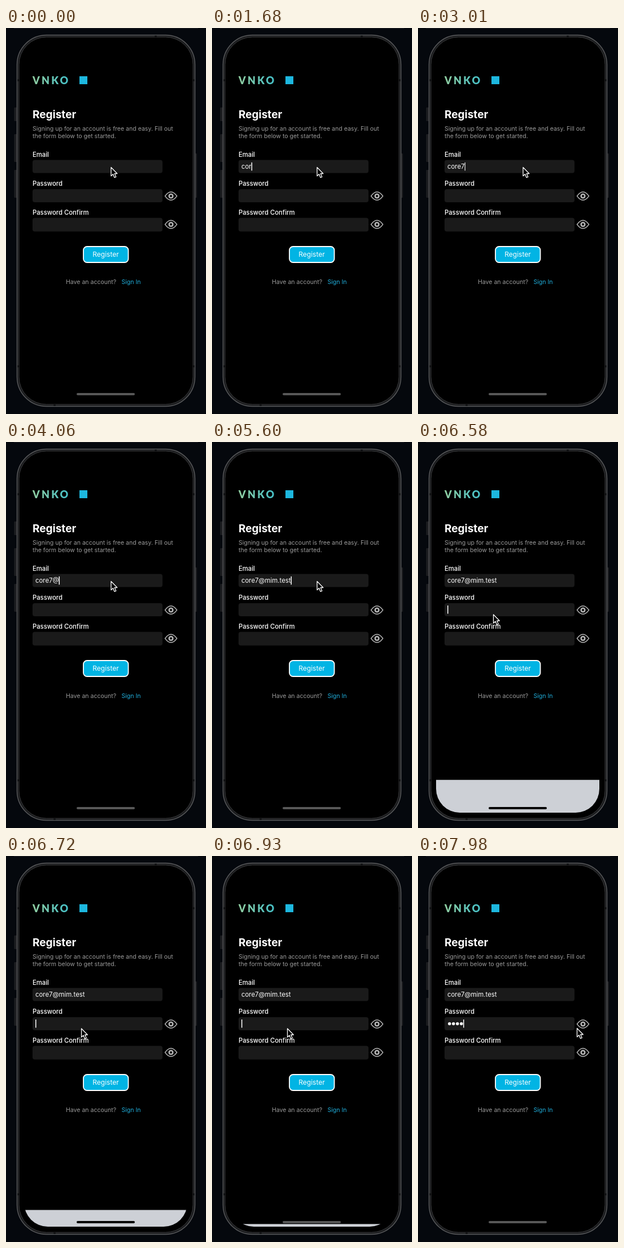
An HTML page for the animation above (8 s loop, 354 by 680 pixels).

```html
<!DOCTYPE html>
<html lang="en">
<head>
<meta charset="utf-8">
<title>Register form</title>
<style>
  html, body { margin: 0; width: 100%; height: 100%; overflow: hidden; background: #05080d; }
  svg { display: block; width: 354px; height: 680px; }
  text { font: 10.55px Inter, sans-serif; fill: #999; }
  .logo { font: 900 18px Lato, sans-serif; letter-spacing: 3.2px; fill: url(#tint); }
  .title { font-size: 19px; font-weight: 700; fill: #fff; }
  .label { font-size: 11.3px; font-weight: 500; fill: #fff; }
  .typed { font-size: 11.4px; fill: #fff; }
  .button { font-size: 12px; fill: #fff; }
  .link { fill: #20aedb; }
  .field { fill: #1a1a1a; }
</style>
</head>
<body>
<svg viewBox="0 0 354 680">
  <defs>
    <linearGradient id="tint" gradientUnits="userSpaceOnUse" x1="47" x2="157" y1="0" y2="0">
      <stop stop-color="#90cea1"/><stop offset="1" stop-color="#0fb5e2"/>
    </linearGradient>
    <clipPath id="screen"><rect x="32" y="21" width="289" height="632" rx="42"/></clipPath>
    <g id="eye">
      <path d="M-10.5 0Q0-14.6 10.5 0Q0 14.6-10.5 0Z" fill="none" stroke="#b4b4b4" stroke-width="1.4"/>
      <circle r="4.6" fill="#b4b4b4"/><circle r="1.9"/>
    </g>
  </defs>

  <path d="M14 .5H340" stroke="#1c1e22"/>
  <g fill="#1d1e21">
    <rect x="14.5" y="140" width="6" height="24" rx="1"/>
    <rect x="14.5" y="187" width="6" height="49" rx="1"/>
    <rect x="14.5" y="250" width="6" height="49" rx="1"/>
    <rect x="333" y="221" width="5" height="78" rx="1"/>
  </g>
  <rect x="19.5" y="12.5" width="315" height="654" rx="52" fill="#1b1c1e" stroke="#5a5b5d" stroke-width="1.4"/>
  <rect x="23" y="16" width="308" height="647" rx="48.5" stroke="#38393b"/>
  <path d="M265 13v3M86 663v3M20 92h3M331 92h3M20 596h3M331 596h3" stroke="#0f1012" stroke-width="3.5"/>

  <text class="logo" x="47" y="98.5">VNKO</text>
  <rect x="130" y="85" width="14" height="14" fill="#1db7df"/>

  <text class="title" x="47" y="159">Register</text>
  <text x="47" y="181.3">Signing up for an account is free and easy. Fill out</text>
  <text x="47" y="194.3">the form below to get started.</text>

  <text class="label" x="47" y="227">Email</text>
  <rect class="field" x="47" y="232.5" width="230" height="23" rx="4"/>
  <text class="label" x="47" y="278">Password</text>
  <rect class="field" x="47" y="284" width="230" height="23" rx="4"/>
  <text class="label" x="47" y="329">Password Confirm</text>
  <rect class="field" x="47" y="334.5" width="230" height="24" rx="4"/>
  <use href="#eye" x="292" y="296"/>
  <use href="#eye" x="292" y="346"/>

  <rect x="137" y="385" width="79.5" height="28" rx="6.5" fill="#01b4e4" stroke="#fff" stroke-width="1.8"/>
  <text class="button" x="176.5" y="403.3" text-anchor="middle">Register</text>
  <text x="106" y="451">Have an account?</text>
  <text class="link" x="204.5" y="451">Sign In</text>

  <text class="typed" id="email" x="52" y="248"></text>
  <g id="dots" fill="#fff">
    <circle cx="55.8" cy="295.5" r="2.7"/><circle cx="62.8" cy="295.5" r="2.7"/>
    <circle cx="69.8" cy="295.5" r="2.7"/><circle cx="76.8" cy="295.5" r="2.7"/>
  </g>
  <rect id="caret" width="1.5" height="14.5" fill="#fff"/>

  <g clip-path="url(#screen)"><rect id="keyboard" x="32" width="289" height="70" fill="#cdd0d6"/></g>
  <rect id="home" x="125" y="643" width="103" height="4" rx="2"/>
  <path id="pointer" d="M0 0V15.2L3.5 12L6 18L8.7 16.8L6.2 11H10.8Z" stroke="#fff" stroke-width="1.3" stroke-linejoin="round"/>
</svg>

<script>
const LOOP = 8000;
const EMAIL = 'core7@mim.test';
const EMAIL_KEYS = [1260, 1470, 1680, 1820, 2660, 3640, 4200, 4340, 4480, 4550, 4760, 5040, 5180, 5250];
const PASSWORD_KEYS = [7140, 7420, 7700, 7910];
const PASSWORD_FOCUS = 6580;
// Caret toggles: on, off, on, ...
const BLINKS = [490, 840, 1190, 2310, 2520, 3010, 3570, 5660, 5950, 6300];
// Pointer stops: time, x, y
const STOPS = [[0, 186, 245.5], [5840, 186, 245.5], [6240, 111, 310], [6450, 133.5, 304],
               [7600, 133.5, 304], [7960, 281.5, 303.5], [LOOP, 281.5, 303.5]];

const [email, dots, caret, keyboard, home, pointer] =
  ['email', 'dots', 'caret', 'keyboard', 'home', 'pointer'].map(id => document.getElementById(id));
const clamp = v => Math.min(1, Math.max(0, v));
const count = (times, t) => times.filter(time => time <= t).length;
const set = (el, attrs) => { for (const key in attrs) el.setAttribute(key, attrs[key]); };

function caretAlpha(t) {
  if (t >= PASSWORD_FOCUS) return 1;
  const n = count(BLINKS, t);
  if (!n) return 0;
  const fade = clamp((t - BLINKS[n - 1] + 50) / 190);
  return n % 2 ? fade : 1 - fade;
}

function pointerAt(t) {
  const i = STOPS.findIndex(stop => stop[0] > t);
  const [t0, x0, y0] = STOPS[i - 1], [t1, x1, y1] = STOPS[i];
  const p = (t - t0) / (t1 - t0), e = p * p * (3 - 2 * p);
  return [x0 + (x1 - x0) * e, y0 + (y1 - y0) * e];
}

function draw(t) {
  const typed = EMAIL.slice(0, count(EMAIL_KEYS, t));
  if (email.textContent !== typed) email.textContent = typed;
  const secret = count(PASSWORD_KEYS, t);
  [...dots.children].forEach((dot, i) => set(dot, { opacity: i < secret ? 1 : 0 }));

  const inPassword = t >= PASSWORD_FOCUS;
  set(caret, {
    x: inPassword ? 52 + 7 * secret : 52 + (typed ? email.getComputedTextLength() : 0),
    y: inPassword ? 288 : 236.8,
    opacity: caretAlpha(t)
  });

  const slide = clamp((t - PASSWORD_FOCUS) / 490);
  const top = inPassword ? 595 + 58 * (1 - (1 - slide) ** 2) : 653;
  set(keyboard, { y: top });
  set(home, { fill: top < 641 ? '#000' : '#575757' });
  set(pointer, { transform: `translate(${pointerAt(t)})` });
}

function tick() {
  draw(performance.now() % LOOP);
  requestAnimationFrame(tick);
}
tick();
</script>
</body>
</html>
```
